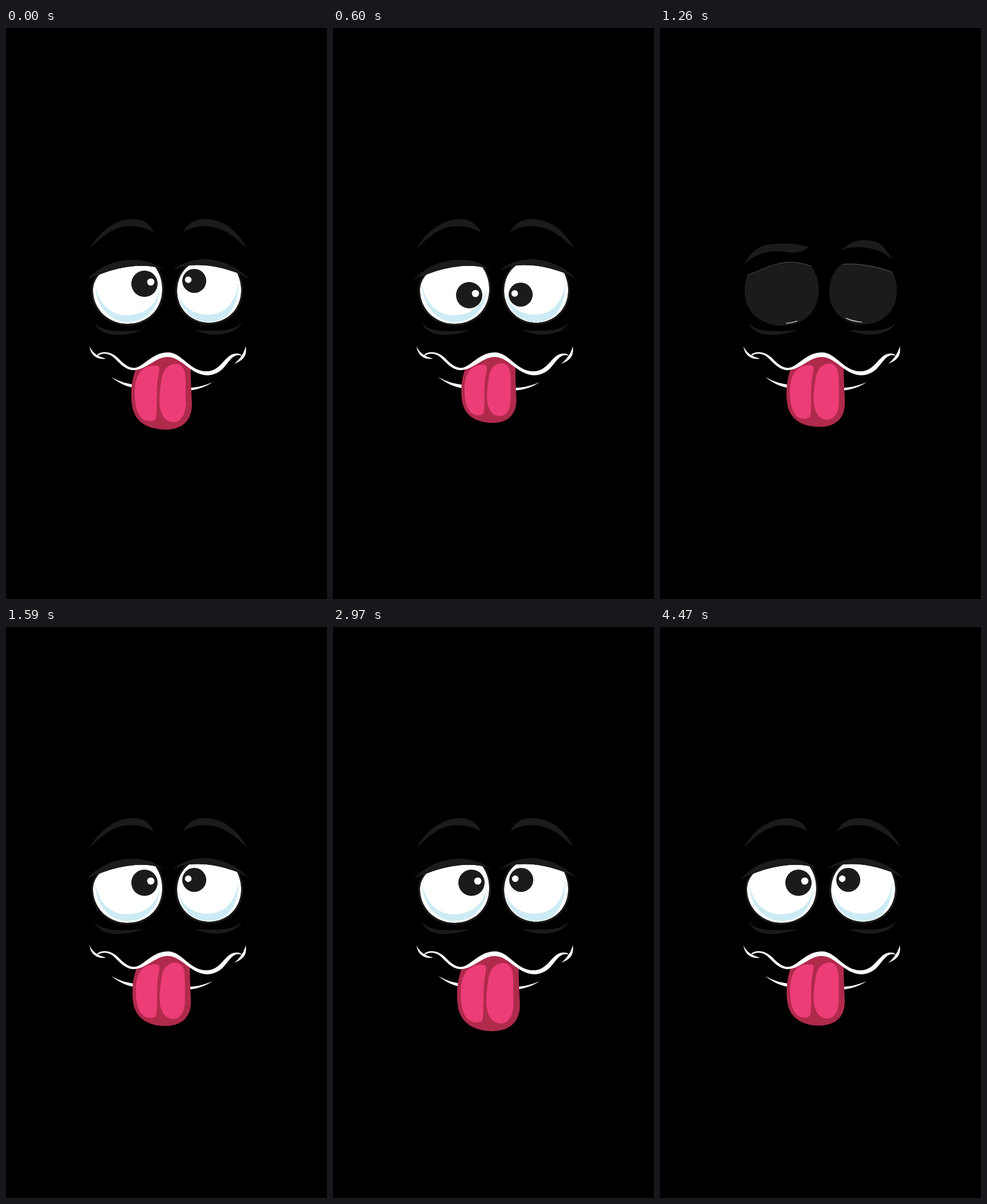
An HTML page for the animation above (4500 ms loop, 561 px wide and 998 px high).

```html
<!DOCTYPE html>
<html lang="en">
<head>
<meta charset="utf-8">
<title>Silly face</title>
<style>
html, body { margin: 0; width: 100%; height: 100%; overflow: hidden; background: #000; }
svg { display: block; width: 100vw; height: 100vh; }
.ink { fill: #1b1b1b; }
.white { fill: #fff; }
.shade { fill: #cdebf4; }
.rim { fill: #1b1b1b; stroke: #1b1b1b; stroke-width: 6; }
.pink { fill: #ec3d77; }
.rose { fill: #af2a4b; }
.gleam { fill: none; stroke: #fff; stroke-width: 1.2; }
.seam { fill: none; stroke: #777; stroke-width: .6; }
</style>
</head>
<body>
<svg viewBox="0 0 561 998">
  <defs>
    <path id="eyeL" d="M163 431C190 420 230 411 261 418C268 428 273 440 273 457C273 492 247 517 212 517C178 517 152 491 152 458C152 448 156 439 163 431Z"/>
    <path id="eyeR" d="M320 415C350 412 380 419 404 428C408 437 411 447 411 458C411 492 386 515 355 515C324 515 299 492 299 459C299 441 307 424 320 415Z"/>
    <clipPath id="inL"><use href="#eyeL"/></clipPath>
    <clipPath id="inR"><use href="#eyeR"/></clipPath>
    <clipPath id="belowLip"><path d="M200 592L222 596C245 596 262 572 283 572C306 572 322 602 350 604V998H200Z"/></clipPath>
  </defs>

  <path id="browL" class="ink"/>
  <path id="browR" class="ink"/>

  <use href="#eyeL" class="rim"/>
  <use href="#eyeR" class="rim"/>
  <g clip-path="url(#inL)">
    <use href="#eyeL" class="white"/>
    <path class="shade" d="M156 449C157 490 185 514 212 514C245 514 267 490 269 456C262 487 240 502 210 502C183 502 162 482 156 449Z"/>
    <g id="pupilL"><circle class="ink" cx="242" cy="447" r="23"/><circle class="white" cx="253" cy="444" r="6.3"/></g>
  </g>
  <g clip-path="url(#inR)">
    <use href="#eyeR" class="white"/>
    <path class="shade" d="M301 463C305 495 330 514 355 514C385 514 407 490 406 444C402 480 382 501 353 501C328 501 308 488 301 463Z"/>
    <g id="pupilR"><circle class="ink" cx="329" cy="442" r="21"/><circle class="white" cx="318.5" cy="440" r="5.8"/></g>
  </g>
  <path id="lidL" class="ink"/>
  <path id="lidR" class="ink"/>
  <g id="slivers">
    <path class="gleam" d="M220 516Q231 515.5 240 512M325 507Q337 513 353 514"/>
    <path class="seam" d="M153 432C175 424 200 410 225 409C240 409 252 412 264 416M319 413C350 411 380 418 406 427"/>
  </g>
  <path class="ink" d="M154 514C165 530 190 532 240 528C215 537 195 538 180 535C165 531 158 523 154 514ZM413 513C403 528 380 531 330 528C352 537 370 538 388 533C402 529 409 522 413 513Z"/>

  <path class="white" d="M184 610C200 619 212 622 230 624V630C212 628 198 621 184 610ZM361 619C345 626 330 629 315 629V634C332 633 348 628 361 619Z"/>
  <g clip-path="url(#belowLip)">
    <g id="tongue">
      <path class="rose" d="M234 580C219 608 217 636 220 658C224 690 250 702 280 702C310 701 325 685 325 657C324 635 323 615 323 598L322 560H240Z"/>
      <path class="pink" d="M266 591C270 594 267 603 265 615C262 640 265 665 262 682C260 688 252 688 244 686C228 680 225 655 225 637C225 615 232 591 258 590Q263 590 266 591Z"/>
      <path class="pink" d="M295 587C310 586 314 600 314 620V655C314 675 306 689 293 689C276 689 268 672 268 650C269 630 271 618 273 608C277 594 285 588 295 587Z"/>
    </g>
  </g>
  <path class="white" d="M160 570C172 563 185 567 196 577C208 590 216 594 224 594C240 593 255 567 283 567C308 567 320 600 350 600C378 600 382 568 404 569Q410 569 412 573C396 566 388 588 376 598C366 606 357 607 350 607C322 605 306 575 283 575C262 574 245 598 222 598C206 597 196 582 186 574C177 568 168 568 160 573Z"/>
  <path class="white" d="M146 556C150 567 160 574 175 578C163 580 148 575 146 556ZM419 556C416 569 409 578 399 587C413 581 422 575 419 556Z"/>
</svg>
<script>
const LOOP = 4500, STEP = 30;
const $ = id => document.getElementById(id);

// Each pair: open pose, closed pose.
const morphs = {
  browL: ["M146 386C165 352 195 334 222 334C242 334 253 345 258 357C240 347 222 345 208 347C185 349 163 369 146 386Z",
          "M147 412C158 394 170 380 194 378C220 376 240 376 259 383C246 394 235 394 218 391C190 388 168 394 147 412Z"],
  browR: ["M421 385C405 355 380 334 348 334C328 333 315 345 310 357C325 347 342 345 356 347C382 349 404 369 421 385Z",
          "M407 406C395 385 385 376 378 374C350 366 332 374 317 388C333 383 345 382 360 384C385 388 396 396 407 406Z"],
  lidL: ["M141 441C160 418 190 405 222 405C245 405 262 412 277 424C272 421 266 419 262 418C225 411 185 422 163 431C155 433 147 437 141 441Z",
         "M153 432C175 424 200 410 225 409C240 409 252 412 264 416C277 432 280 455 275 476C262 535 165 535 150 476C146 460 148 444 153 432Z"],
  lidR: ["M425 439C405 417 375 404 345 404C322 405 305 412 291 424C300 420 310 416 320 415C350 412 380 419 404 428C412 431 418 435 425 439Z",
         "M406 427C385 420 365 413 345 412.5C335 412 327 412 319 413C300 425 293 455 297 473C308 533 400 533 412 475C416 455 413 440 406 427Z"]
};

// Tracks of [time, value...], eased between stops.
const tongueTip = [[0, 702], [210, 707.5], [630, 690], [1090, 702], [1420, 693], [1890, 708.5], [2250, 697],
  [2620, 701.5], [3000, 706.5], [3280, 700], [3800, 712.3], [4300, 692], [4500, 697]];
const blink = [[0, 0], [930, 0], [1230, 1], [1290, 1], [1590, 0]];
const lookL = [[0, 0, 0], [30, 0, 0], [300, -67, 8], [590, -4, 20], [930, -4, 20], [1260, 0, 0]];
const lookR = [[0, 0, 0], [30, 0, 0], [300, 59, 10], [590, -1, 24], [930, -1, 24], [1260, 0, 0]];

function sample(track, t) {
  const i = track.findIndex(k => k[0] > t);
  if (i < 0) return track[track.length - 1].slice(1);
  const a = track[i - 1], b = track[i];
  const e = (1 - Math.cos(Math.PI * (t - a[0]) / (b[0] - a[0]))) / 2;
  return a.slice(1).map((v, j) => v + (b[j + 1] - v) * e);
}

function mix([from, to], k) {
  const ends = to.match(/[\d.]+/g);
  let i = 0;
  return from.replace(/[\d.]+/g, n => (+n + (ends[i++] - n) * k).toFixed(2));
}

function draw(t) {
  const [shut] = sample(blink, t);
  for (const id in morphs) $(id).setAttribute("d", mix(morphs[id], shut));
  $("slivers").setAttribute("opacity", shut > 0.97 ? 1 : 0);
  $("pupilL").setAttribute("transform", `translate(${sample(lookL, t)})`);
  $("pupilR").setAttribute("transform", `translate(${sample(lookR, t)})`);
  const size = (sample(tongueTip, t)[0] - 575) / 127;
  $("tongue").setAttribute("transform", `translate(277.5 575) scale(${size}) translate(-277.5 -575)`);
}

const start = performance.now();
function tick() {
  const t = (performance.now() - start) % LOOP;
  draw(Math.floor(t / STEP) * STEP);
  requestAnimationFrame(tick);
}
draw(0);
requestAnimationFrame(tick);
</script>
</body>
</html>
```
